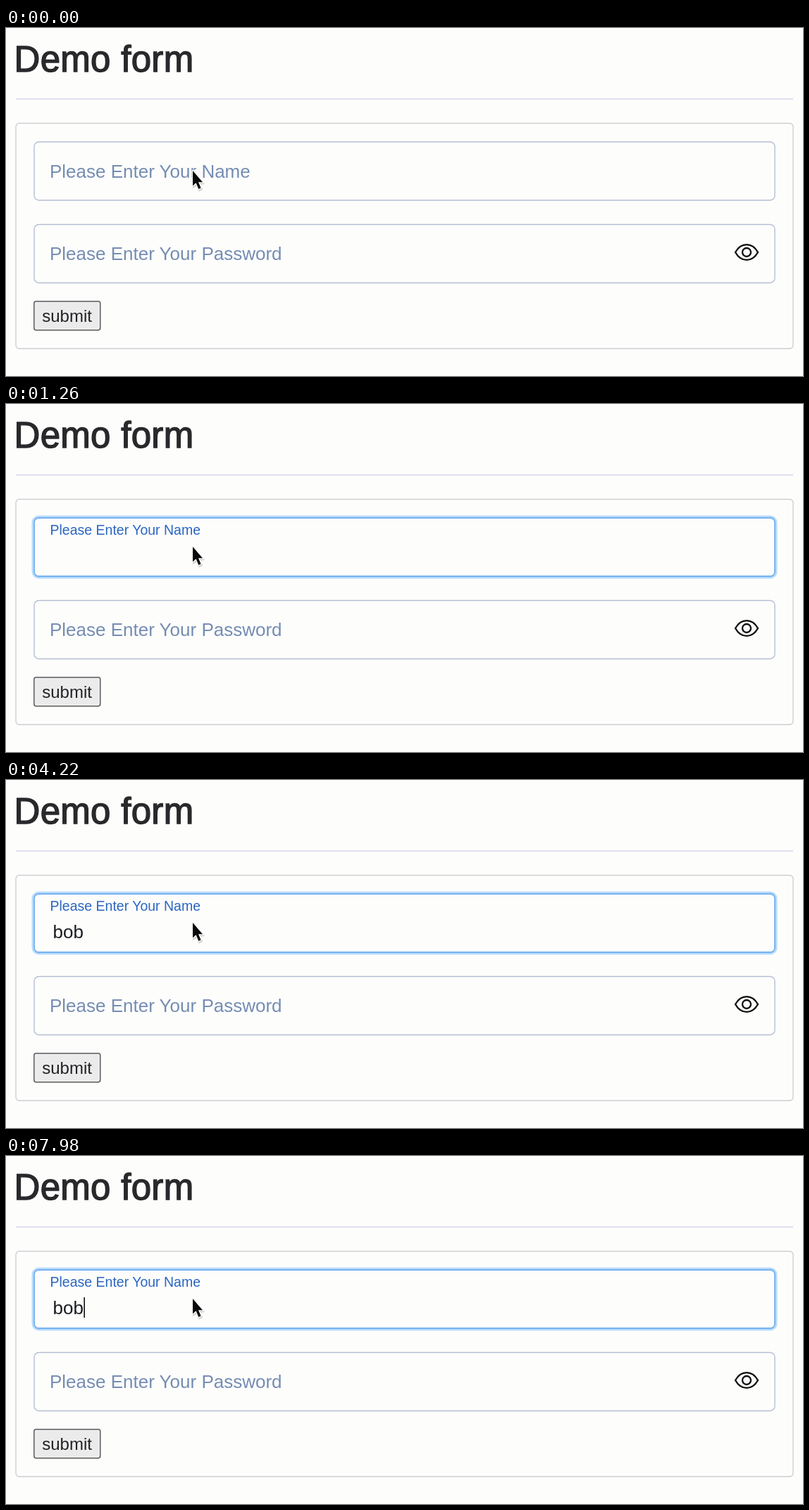
These frames come from a looping animation (1131 by 495 pixels, 8 s). An HTML page:

```html
<!DOCTYPE html>
<html lang="en">
<head>
<meta charset="utf-8">
<title>Demo form</title>
<style>
  html, body { margin: 0; width: 100%; height: 100%; overflow: hidden; background: #fdfdfc; }
  svg { display: block; font: 26px "Liberation Sans", Arial, sans-serif; }
  .box { fill: none; stroke: #b5bfd3; stroke-width: 1.4; }
  .hint { fill: #758db2; }
</style>
</head>
<body>
<svg width="1131" height="495" viewBox="0 0 1131 495">
  <text x="11.5" y="62" font-size="51" letter-spacing=".3" fill="#29292c" stroke="#29292c" stroke-width="1.4">Demo form</text>
  <path d="M14 101H1117" stroke="#d9d9ef" stroke-width="1.6"/>
  <rect x="14" y="135.5" width="1103" height="320.5" rx="5" fill="none" stroke="#cdcfd3" stroke-width="1.4"/>

  <rect id="ring" x="38.5" y="160.5" width="1054" height="86" rx="8" fill="none" stroke="#b9dbfb" stroke-width="4"/>
  <rect id="field" class="box" x="40" y="162" width="1051" height="83" rx="6.5"/>
  <text id="label">Please Enter Your Name</text>
  <text id="typed" x="66.6" y="224.5" fill="#1b1c20"></text>
  <rect id="caret" y="201" width="1.6" height="29" fill="#111"/>

  <rect class="box" x="40" y="279.5" width="1051" height="83" rx="6.5"/>
  <text class="hint" x="62" y="330">Please Enter Your Password</text>
  <g fill="none" stroke="#0c0c0c" stroke-width="2.3" stroke-linejoin="round">
    <path d="M1035 319C1043 304.5 1059 304.5 1067 319C1059 333.5 1043 333.5 1035 319Z"/>
    <circle cx="1051" cy="319" r="6"/>
  </g>

  <rect x="39.8" y="388.8" width="94" height="41" rx="3" fill="#ebebec" stroke="#5c5c5e" stroke-width="1.5"/>
  <text x="51.2" y="418" font-size="24" fill="#232326">submit</text>

  <g stroke-linejoin="round">
    <path id="shade" d="M265 203V224.5L269.6 220.3L273.3 229L276.6 227.5L273 219.2H279Z" transform="translate(1 2)" fill="#0002" stroke="#0002" stroke-width="3"/>
    <path d="M265 203V224.5L269.6 220.3L273.3 229L276.6 227.5L273 219.2H279Z" fill="#080808" stroke="#fff" stroke-width="2.6" paint-order="stroke"/>
  </g>
</svg>
<script>
  const LOOP = 8000, FOCUS = 310, FADE = 200, BLINK = 500;
  const WORD = "bob", KEYS = [3480, 3600, 3740], LETTER = 14.46;
  const [ring, field, label, typed, caret] =
    ["ring", "field", "label", "typed", "caret"].map(id => document.getElementById(id));

  const mix = (a, b, p) => a + (b - a) * p;
  const mixColor = (a, b, p) => `rgb(${a.map((v, i) => mix(v, b[i], p))})`;

  // Uneven playback: three evenly spaced steps are held 20, 100 and 20 ms.
  function stepTime(t) {
    const rest = t % 140;
    const step = rest < 20 ? 0 : rest < 120 ? 1 : 2;
    return (Math.floor(t / 140) * 3 + step) * 140 / 3;
  }

  function draw(t) {
    const u = Math.min(1, Math.max(0, (t - FOCUS) / FADE));
    const p = 1 - (1 - u) ** 2;
    ring.style.opacity = p;
    field.style.stroke = mixColor([181, 191, 211], [116, 177, 239], p);
    field.style.strokeWidth = mix(1.4, 1.8, p);
    label.setAttribute("transform",
      `translate(${mix(62, 62.5, p)} ${mix(212.5, 186, p)}) scale(${mix(1, .75, p)})`);
    label.style.fill = mixColor([117, 141, 178], [42, 102, 194], p);

    const count = KEYS.filter(k => t >= k).length;
    const since = t - (count ? KEYS[count - 1] : FOCUS);
    typed.textContent = WORD.slice(0, count);
    caret.setAttribute("x", 67 + count * LETTER);
    caret.style.opacity = since >= 0 && since % (2 * BLINK) < BLINK ? 1 : 0;
  }

  const start = performance.now();
  function tick() {
    draw(stepTime((performance.now() - start) % LOOP));
    requestAnimationFrame(tick);
  }
  tick();
</script>
</body>
</html>
```
